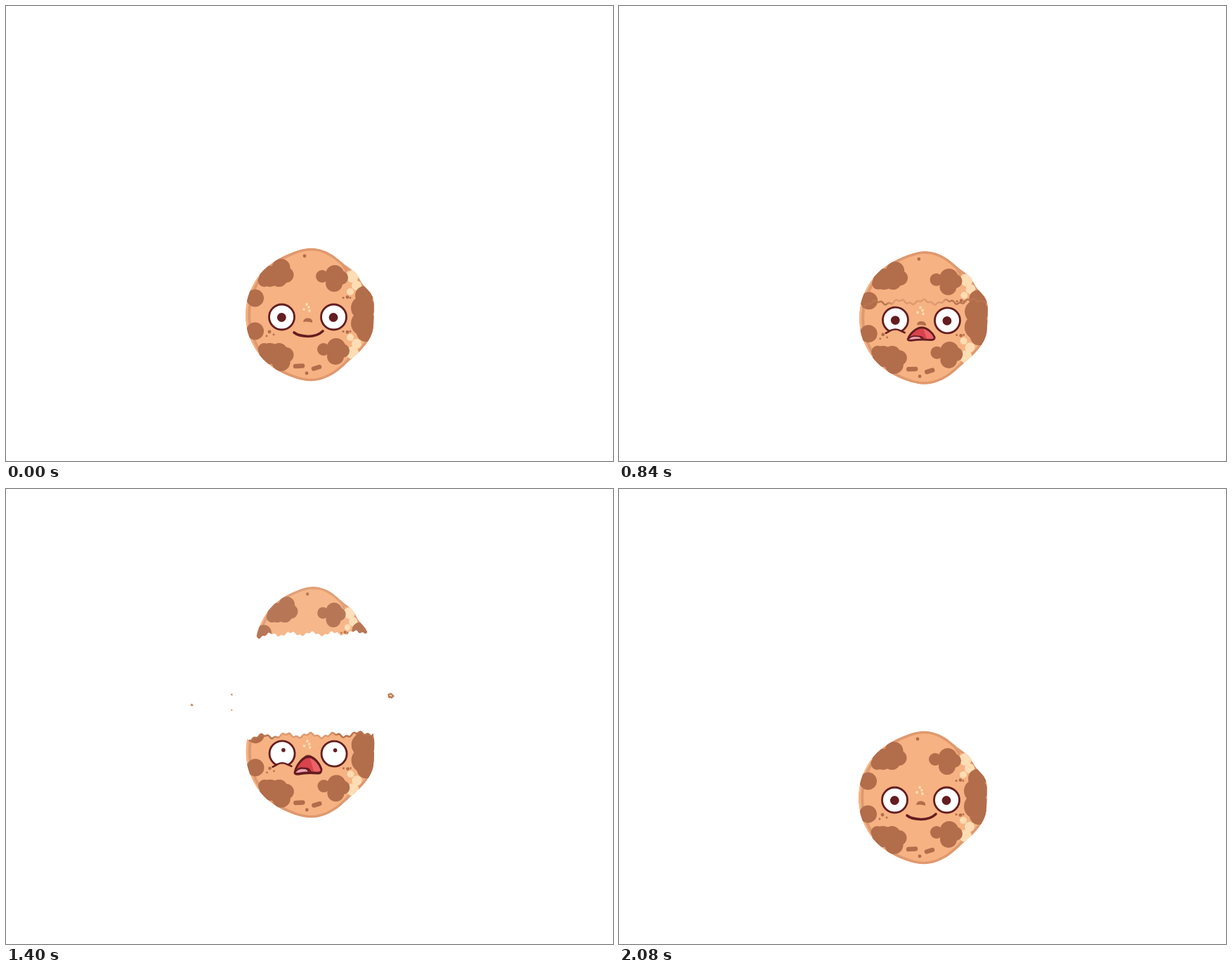
Recreate the animation shown at these times as an HTML page. Size 864 by 648 pixels, loop 2160 ms.

```html
<!DOCTYPE html>
<html lang="en">
<head>
<meta charset="utf-8">
<title>Cookie pop</title>
<style>
  html, body { margin: 0; width: 100%; height: 100%; overflow: hidden; background: #fff; }
  svg { display: block; width: 100vw; height: 100vh; }
  .line { fill: none; stroke: #641d20; stroke-linecap: round; stroke-linejoin: round; }
  .rim { fill: none; stroke: #df996f; stroke-width: 4; stroke-linecap: round; }
  .chip { fill: #b26d4b; }
  .cream { fill: #ffddb4; }
</style>
</head>
<body>
<svg viewBox="0 0 864 648">
  <defs>
    <linearGradient id="crackTone" gradientUnits="userSpaceOnUse" x1="343" x2="520">
      <stop offset=".2" stop-color="#b97550"/><stop offset=".26" stop-color="#df996f"/>
      <stop offset=".66" stop-color="#df996f"/><stop offset=".72" stop-color="#b97550"/>
    </linearGradient>
    <clipPath id="edge"><path id="edgePath"/></clipPath>
    <clipPath id="above"><path id="abovePath"/></clipPath>
    <clipPath id="below"><path id="belowPath"/></clipPath>
    <clipPath id="lips"><use href="#mouthShape"/></clipPath>
    <path id="mouthShape" d="M411 469C413 463 422 453.500 430 453.500S446 461 448.500 467Q449 471 443 471Q428 470 415 472Q409 472 411 469Z"/>
    <g id="body" clip-path="url(#edge)"></g>
  </defs>
  <g id="root">
    <g id="top"><use href="#body" clip-path="url(#above)"/></g>
    <g id="bottom">
      <g id="lower"><use href="#body"/></g>
      <path id="crack" fill="none" stroke="url(#crackTone)" stroke-width="2.500" pathLength="100"/>
      <path class="chip" d="M423 450Q424 444 430 444.500Q437 445 436 451Q430 448.500 423 450Z"/>
      <g id="eyes">
        <g fill="#fff" stroke="#641d20" stroke-width="2.800">
          <circle cx="392.500" cy="443" r="18"/>
          <circle cx="466.500" cy="443" r="18"/>
        </g>
        <g id="pupils" fill="#641d20">
          <circle cx="392.300" cy="443.500"/>
          <circle cx="466" cy="443.500"/>
        </g>
      </g>
      <path id="lids" class="line" stroke-width="3" d="M372 444Q392 448.500 411 444M449 441.500Q469 446 489 442"/>
      <g id="bag">
        <path id="bagFill" fill="#f6b282" d="M378 462Q392 452 407 461L405 465Q392 468 380 466Z"/>
        <path class="line" stroke-width="2.500" d="M379 462Q383 460 386 458Q393 455 399 458L406 461"/>
      </g>
      <path id="smile" class="line" stroke-width="3.600" d="M410 465Q416 470 430 470.500Q443 470.500 451 463"/>
      <g id="mouth">
        <use href="#mouthShape" fill="#d9434d"/>
        <g clip-path="url(#lips)">
          <path fill="#ec6267" d="M431 452L438 470H452V452Z"/>
          <path fill="#f0a0b2" stroke="#641d20" stroke-width="1.800" d="M408 474Q414 464 424 466Q430 465 432 474Z"/>
          <path class="line" stroke-width="1.500" d="M427 466Q432 466 434 471"/>
        </g>
        <use href="#mouthShape" class="line" stroke-width="2.800"/>
      </g>
    </g>
  </g>
  <g id="smoke"></g>
  <g id="sparks" fill="#a33d52">
    <path d="M358 208Q368 215 369.500 244Q358 236 358 208Z"/>
    <path d="M401 205Q407 207 410 218Q411 206 417 205Q418 220 411.500 240Q402 222 401 205Z"/>
    <path d="M454 208Q459 209 459.500 219Q461 211 466 212Q465 228 456 240Q447 226 454 208Z"/>
    <path d="M495 224Q495 240 484 249Q481 235 495 224Z"/>
  </g>
  <g id="crumbs" stroke="#b97550" stroke-linejoin="round"></g>
</svg>
<script>
const LOOP = 2160, STEP = 40;
const CX = 432, CY = 440, BREAK = 418;
const $ = id => document.getElementById(id);
const rad = deg => deg * Math.PI / 180;
const lerp = (a, b, k) => a + (b - a) * k;

function add(parent, tag, attrs) {
  const el = document.createElementNS('http://www.w3.org/2000/svg', tag);
  for (const k in attrs) el.setAttribute(k, attrs[k]);
  return parent.appendChild(el);
}

// Path through point(v) for v from a to b
function trace(a, b, step, point) {
  let d = 'M';
  for (let v = a; v <= b; v += step) d += point(v).map(n => n.toFixed(2)) + ' ';
  return d;
}

// Nearly round cookie: [angle, width, height] of its bulges and dents
const bulges = [[-87, 16, 4], [-54, 13, -4], [-31, 9, -4], [-15, 9, 2.5],
  [16, 9, 1.5], [48, 17, -5], [87, 16, 3]];
function radius(angle) {
  return bulges.reduce((r, [at, width, height]) =>
    r + height * Math.exp(-(((angle - at) / width) ** 2)), 91.3);
}
const ring = inset => trace(-180, 176, 4, angle => {
  const r = radius(angle) - inset(angle);
  return [CX + r * Math.cos(rad(angle)), CY + r * Math.sin(rad(angle))];
}) + 'Z';

const crackY = x => BREAK - 1 - 2.6 * Math.cos((x - 364) * Math.PI / 17)
  + 1.4 * Math.sin(x * 0.62) - 4 * ((x - CX) / 85) ** 3;
const crackLine = (a, b) => trace(a, b, 1.5, x => [x, crackY(x)]);
const wideCrack = crackLine(330, 535);
$('edgePath').setAttribute('d', ring(() => 0));
$('crack').setAttribute('d', crackLine(345, 518));
$('abovePath').setAttribute('d', wideCrack + 'V330H330Z');
$('belowPath').setAttribute('d', wideCrack + 'V550H330Z');

const body = $('body');
const disc = (parent, cx, cy, r, cls) => add(parent, 'circle', { cx, cy, r, class: cls });
const group = (x, y, flip) => add(body, 'g', { transform: `translate(${x} ${y}) scale(1 ${flip})` });

add(body, 'path', { d: ring(() => 0), fill: '#f6b282' });
add(body, 'path', { d: ring(a => 1.5 + 4 * Math.max(0, -Math.cos(rad(a))) ** 2), class: 'rim' });
add(body, 'path', { d: 'M455 350Q475 357 484 377M469 521Q484 512 491 497', class: 'rim' });

// The lower half of the pattern mirrors the upper half
for (const flip of [1, -1]) {
  const side = group(0, 439.5 - flip * 439.5, flip);
  for (const [x, y, r] of [[493, 385, 9], [499, 398, 7], [490, 407, 5]]) disc(side, x, y, r, 'cream');
  for (const [x, r] of [[480, 1.5], [486, 2.4], [490, 1.4]]) disc(side, x, 417 - r, r, 'chip');
  disc(side, 354.5, 416, 12.5, 'chip');

  const big = group(384.5, CY - flip * 59, flip);
  for (const [x, y, r] of [[7, -8, 13], [-9, 4, 15], [14, 2, 11], [-17, 10, 9], [4, 7, 12]]) disc(big, x, y, r, 'chip');

  const small = group(466 - flip, CY - flip * 52, 1);
  for (const [x, y, r] of [[3, -6, 13], [2, 7, 12], [-15, -3, 9], [12, -1, 10]]) disc(small, x, y, r, 'chip');
}
for (const [x, y, r] of [[510, 412, 13], [508, 430, 17], [509, 452, 18], [512, 465, 13]]) disc(body, x, y, r, 'chip');
for (const [x, y, r] of [[428, 523, 2.4], [425, 356, 2.4], [375, 464, 2.4], [371, 470, 1.4], [381, 468, 1.4]]) disc(body, x, y, r, 'chip');
for (const [x, y] of [[428, 425], [424, 432], [431, 429], [432, 434]]) disc(body, x, y, 1.9, 'cream');
add(body, 'path', { d: 'M412 513L422 512.500M438 516.500L446 514', stroke: '#b26d4b', 'stroke-width': 6.5, 'stroke-linecap': 'round' });

// A puff is one big disc with three lobes on one side
const DARK = '#b35a2e', ORANGE = '#f7a263', PEACH = '#f6b282';
const puffs = [
  [335, 224, 21, 15, DARK], [374, 182, 7, 40, DARK], [488, 190, 18, 50, DARK],
  [402, 209, 19, -30, ORANGE], [429, 186, 21, 100, ORANGE], [518, 261, 17, -100, ORANGE],
  [446, 197, 25, 0, PEACH]
].map(([x, y, r, angle, fill]) => {
  const el = add($('smoke'), 'g', { fill });
  disc(el, x, y, r, '');
  for (const turn of [-40, 0, 40]) {
    const a = rad(angle + turn), far = r * (turn ? 1.35 : 1);
    disc(el, x + far * Math.cos(a), y + far * Math.sin(a), r * (turn ? 0.58 : 0.7), '');
  }
  return { x, y, el };
});

let seed = 7;
const random = () => (seed = seed * 16807 % 2147483647) / 2147483647;

// Big crumbs are placed, specks are scattered
const crumbs = [[314, 319, 6, 400], [354, 337, 5, 380], [354, 282, 4.5, 400], [424, 337, 4, 320], [487, 323, 4.3, 330], [514, 287, 7, 520]];
for (let i = 0; i < 7; i++) {
  crumbs.push([lerp(360, 540, random()), lerp(265, 347, random()), 1 + random(), 280 + 100 * random()]);
}
const crumbEls = crumbs.map(([x, , r]) => add($('crumbs'), 'path', {
  d: r < 3 ? 'M-1 0Q0 -2 1 0Q0 2 -1 0Z' : 'M-1 .2L-.5 -.8L1 -.7L.8 .4L.2 .2L0 .9Z',
  fill: r < 3 ? '#b97550' : r > 6 ? '#ffddb4' : '#efb083',
  'vector-effect': 'non-scaling-stroke'
}));

// Eased value from [time, value] keys
function key(t, ...keys) {
  if (t <= keys[0][0]) return keys[0][1];
  for (let i = 1; i < keys.length; i++) {
    const [t0, v0] = keys[i - 1], [t1, v1] = keys[i];
    if (t <= t1) return lerp(v0, v1, (1 - Math.cos(Math.PI * (t - t0) / (t1 - t0))) / 2);
  }
  return keys[keys.length - 1][1];
}

const place = (id, value) => $(id).setAttribute('transform', value);
const show = (id, on) => { $(id).style.display = on ? '' : 'none'; };
const about = (x, y, sx, sy = sx) => `translate(${x} ${y}) scale(${sx} ${sy}) translate(${-x} ${-y})`;
const flight = t => Math.min(0, -293 + 0.00303 * (t - 1240) ** 2);
// 0 when whole, 1 while the halves are apart
const apart = t => key(t, [910, 0], [1020, 1], [1440, 1], [1560, 0]);

function drawCookie(t) {
  const tilt = key(t, [0, 0], [440, 2.4], [600, 1.4], [840, 0.6], [960, 0.2], [1440, 0.2],
    [1600, -3.3], [1720, 3], [1840, -3], [1950, 1.5], [2060, 0]);
  const drop = key(t, [580, 0], [840, 4.5], [1440, 4.5], [1600, 3], [1760, 0]);
  const pop = key(t, [1680, 1], [1800, 1.1], [1920, 0.98], [2000, 1.01], [2060, 1]);
  place('root', `translate(0 ${drop}) rotate(${tilt} 432 534) ${about(CX, CY, pop)}`);

  const split = t >= 600 && t <= 1720;
  const shrink = key(t, [930, 0], [1010, 0.17], [1240, 0.17], [1400, 0.12], [1560, 0]);
  show('top', split);
  place('top', `translate(${2 * apart(t)} ${flight(t)}) ${about(CX, BREAK, 1 - shrink, 1 - shrink * 0.6)}`);
  $('top').style.opacity = 1 - shrink * (t < 1240 ? 1 : 0.6);
  place('bottom', `translate(0 ${-70.5 * apart(t)})`);
  $('lower').style.clipPath = split ? 'url(#below)' : 'none';

  const length = key(t, [160, 0], [280, 20], [560, 100], [1700, 100], [1840, 0]);
  show('crack', length > 0.1);
  $('crack').setAttribute('stroke-dasharray', `0 ${50 - length / 2} ${length} 200`);
}

function drawFace(t) {
  const shocked = t >= 600 && t < 1800, closed = t >= 1540 && t < 1760;
  show('eyes', !closed);
  show('lids', closed);
  show('smile', !shocked);
  show('mouth', shocked);
  show('bag', t >= 680 && t < 1800);
  show('bagFill', !closed);
  place('bag', `translate(0 ${closed ? 10 : 0})`);

  const fear = apart(t);
  for (const pupil of $('pupils').children) pupil.setAttribute('r', lerp(6.4, 2.8, fear));
  place('pupils', `translate(${key(t, [880, 0], [1040, -1.5], [1400, 2], [1540, 0])} ${-5.5 * fear})`);
  const open = key(t, [600, 0.4], [720, 1], [1460, 1], [1580, 1.1], [1720, 1.1], [1800, 0.5]);
  place('mouth', about(430, 472, 1, open + 0.35 * fear));
}

function drawBurst(t) {
  const smoky = t >= 940 && t < 1180;
  show('smoke', smoky);
  show('sparks', t >= 980 && t < 1120);
  if (smoky) {
    const grow = key(t, [920, 0.2], [1020, 1], [1050, 1], [1180, 0]);
    const spread = key(t, [920, 0.5], [1040, 1], [1180, 1.25]);
    const rise = (flight(t) - flight(1040)) * (t < 1040 ? 1 : 0.5);
    for (const id of ['smoke', 'sparks']) place(id, `translate(0 ${rise}) ${about(430, 225, spread)}`);
    for (const p of puffs) p.el.setAttribute('transform', about(p.x, p.y, grow));
  }
  crumbs.forEach(([x, y, r, life], i) => {
    const el = crumbEls[i], k = Math.min(1, (t - 930) / 110), u = Math.max(0, (t - 1040) / life);
    const on = k > 0 && u < 1;
    el.style.display = on ? '' : 'none';
    if (!on) return;
    const out = 1 - (1 - u) ** 3;
    const px = CX + (x - CX) * (0.6 + 0.4 * k + 0.42 * out);
    const py = lerp(lerp(400, y, k), 300, 0.6 * out);
    const size = r * (1 - u) ** 0.6;
    el.setAttribute('transform', `translate(${px} ${py}) rotate(${u * 60}) scale(${size})`);
    el.style.strokeWidth = Math.min(2, size * 0.6);
  });
}

const start = performance.now();
function frame() {
  const clock = (performance.now() - start) % LOOP;
  const t = Math.min(LOOP - 2 * STEP, Math.floor(clock / STEP) * STEP);
  drawCookie(t);
  drawFace(t);
  drawBurst(t);
  requestAnimationFrame(frame);
}
frame();
</script>
</body>
</html>
```
